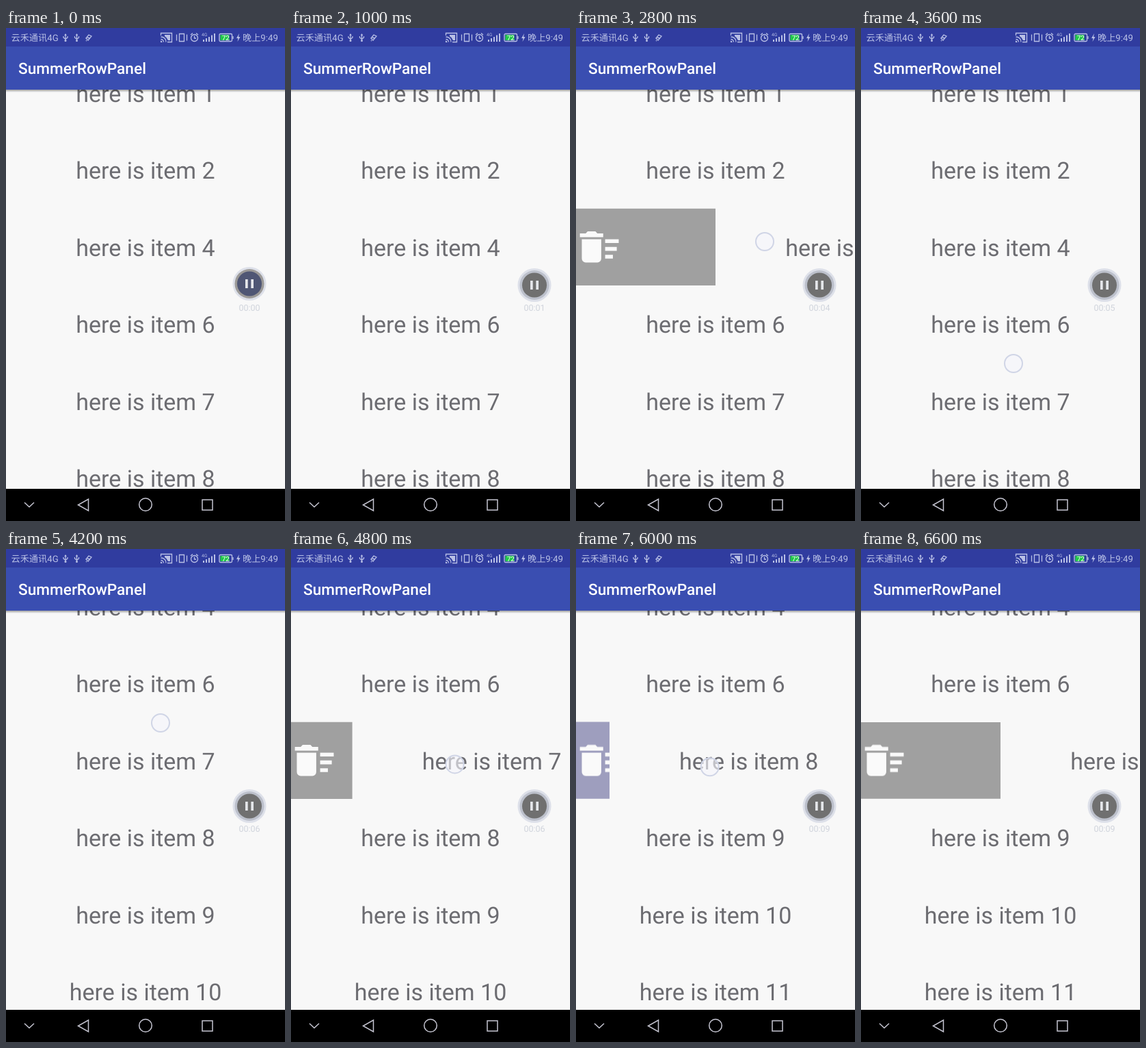
An HTML page that plays this animation: 408x720 px, repeating every 6.8 s.

```html
<!DOCTYPE html>
<html lang="zh">
<head>
<meta charset="utf-8">
<title>Swipe list</title>
<style>
  html, body { margin: 0; width: 100%; height: 100%; overflow: hidden; background: #f8f8f8; }
  svg { display: block; }
  #stage { width: 408px; height: 720px; font-family: Roboto, sans-serif; text-rendering: geometricPrecision; }
  .row { font-size: 34px; fill: #6c6c71; text-anchor: middle; }
  .status { font: 13.2px Roboto, "Noto Sans CJK SC", "Noto Sans CJK", sans-serif; fill: #b9c0e6; }
  .icon { fill: none; stroke: #b9c0e6; stroke-width: 1.3; }
  .solid { fill: #b9c0e6; stroke: none; }
  .nav { fill: none; stroke: #c6c6d2; stroke-width: 1.5; }
</style>
</head>
<body>
<svg id="stage" viewBox="0 0 408 720">
  <defs>
    <linearGradient id="shade" x2="0" y2="1">
      <stop offset="0" stop-color="#000" stop-opacity=".36"/>
      <stop offset="1" stop-color="#000" stop-opacity="0"/>
    </linearGradient>
    <g id="usb">
      <path d="M0-5V4M-3-2V0L0 2.500L3 0V-2"/>
      <path class="solid" d="M-1.800-3L0-6L1.800-3Z"/>
      <circle class="solid" cy="4.500" r="1.500"/>
    </g>
  </defs>
  <rect width="408" height="720" fill="#f8f8f8"/>
  <g id="rows"></g>

  <rect y="90" width="408" height="4" fill="url(#shade)"/>
  <rect width="408" height="90" fill="#3a4eb1"/>
  <rect width="408" height="27" fill="#303c9f"/>
  <text x="18" y="67" font-size="22.67" font-weight="500" fill="#fff">SummerRowPanel</text>

  <text class="status" x="7.5" y="19">云禾通讯4G</text>
  <g class="icon">
    <use href="#usb" x="87" y="14"/>
    <use href="#usb" x="103.5" y="14"/>
    <path d="M117 15L121 10L125 12L120 18ZM119 14L123 15M118 18L117 19"/>
    <path d="M226.500 11V7.500H242.500V20.500H236M226.500 13A7 7 0 0 1 234 20.500M226.500 16.500A4 4 0 0 1 230.500 20.500"/>
    <path class="solid" d="M226 18.500A2.500 2.500 0 0 1 228.500 21H226ZM232 10H240V18H237A10 10 0 0 0 232 12Z"/>
    <path d="M253.500 8.500H260.500V19.500H253.500ZM249.500 9.500V18.500M264.500 9.500V18.500"/>
    <circle cx="275.500" cy="14.500" r="5"/>
    <path d="M275.500 11.500V15H278M270 10L273 7.500M278 7.500L281 10"/>
    <path stroke-width="2" d="M289 20V17M293 20V15M297 20V13M301 20V10.500M305 20V8"/>
    <rect x="312" y="8.500" width="18.500" height="11" rx="1.500"/>
    <path d="M332 12V16"/>
    <rect class="solid" x="313.500" y="10" width="13" height="8" style="fill:#22c94a"/>
    <path class="solid" d="M341 8L337 15H339.500L338.500 20L342.500 13H340Z"/>
  </g>
  <text x="286" y="12" font-size="6.500" fill="#b9c0e6">4G</text>
  <text x="321.300" y="18" font-size="10" text-anchor="middle" fill="#fff">72</text>
  <text class="status" x="346" y="19">晚上9:49</text>

  <g id="button">
    <circle r="24.500" fill="#dde0e9"/>
    <circle id="rim" r="21.500"/>
    <circle id="core" r="18"/>
    <path d="M-6-6.500H-2.300V6.500H-6ZM2.300-6.500H6V6.500H2.300Z" fill="#e4e6ea"/>
  </g>
  <text id="clock" x="356" y="413" font-size="12.500" text-anchor="middle" fill="#d0d4dc"></text>
  <circle id="touch" r="13" fill="#f5f6fc" fill-opacity=".62" stroke="#d0d5e6" stroke-width="2"/>

  <rect y="673" width="408" height="47" fill="#000"/>
  <g class="nav">
    <path d="M27 693L34 699.500L41 693"/>
    <path d="M120.500 688V705L105.500 696.500Z"/>
    <circle cx="204" cy="696" r="9.300"/>
    <rect x="287" y="689" width="15" height="15"/>
  </g>
</svg>
<script>
const LOOP = 6800, STEP = 200, ROW = 112.5, TOP = 38.5, OPEN = 204, SNAP = 300;
const NS = "http://www.w3.org/2000/svg";
const $ = id => document.getElementById(id);

// The finger moves by dx, dy during dur; a drag without a row scrolls the list.
const drags = [
  { row: 4, start: 1200, dur: 1000, x: 160, y: 326, dx: 118, dy: -6 },
  { row: 4, start: 2800, dur: 400, x: 276, y: 312, dx: -126, dy: 6 },
  { start: 3600, dur: 600, x: 223, y: 490, dx: 3, dy: -236 },
  { row: 7, start: 4400, dur: 500, x: 150, y: 316, dx: 112, dy: -2 },
  { start: 5400, dur: 100, x: 34, y: 310, dx: 0, dy: 0 },
  { row: 8, start: 5800, dur: 460, x: 147, y: 320, dx: 112, dy: -4, tint: "#9e9ebe" }
];
const removed = { row: 7, start: 5400, dur: 300 };

const part = (t, start, dur) => Math.min(1, Math.max(0, (t - start) / dur));
const easeOut = p => 1 - (1 - p) ** 2;
const pressed = (d, t) => t >= d.start && t <= d.start + d.dur;

// A row follows the finger, then snaps open or shut on release.
function offset(row, t) {
  let x = 0;
  for (const d of drags) {
    if (d.row !== row || t < d.start) continue;
    x += d.dx * part(t, d.start, d.dur);
    const rest = d.dx > 0 ? OPEN : 0;
    x += (rest - x) * easeOut(part(t, d.start + d.dur, SNAP));
  }
  return x;
}

function scrolled(t) {
  return drags.filter(d => !d.row).reduce((y, d) => y - d.dy * part(t, d.start, d.dur), 0);
}

function set(el, attrs) {
  for (const k in attrs) el.setAttribute(k, attrs[k]);
}

function makeRow(n) {
  const g = document.createElementNS(NS, "g");
  g.innerHTML = `<svg width="0" height="${ROW}" overflow="hidden">
    <rect width="408" height="${ROW}"/>
    <g fill="#fafafa" transform="translate(0 22.2) scale(2.84)">
      <path d="M3 8H13V18a2 2 0 0 1-2 2H5a2 2 0 0 1-2-2ZM2 7V5H5L6 4H10L11 5H14V7Z"/>
      <path d="M15 8h7v2h-7zm0 4h6v2h-6zm0 4h4v2h-4z"/>
    </g></svg>
    <text class="row" y="69">here is item ${n}</text>`;
  $("rows").append(g);
  const [panel, label] = g.children;
  return { n, g, panel, label, fill: panel.firstElementChild };
}

const rows = [];
for (let n = 1; n <= 11; n++) if (n !== 3 && n !== 5) rows.push(makeRow(n));

function draw(t) {
  const drag = drags.find(d => pressed(d, t));
  const gone = part(t, removed.start, removed.dur);
  const shift = scrolled(t);

  rows.forEach((r, i) => {
    const x = offset(r.n, t);
    const y = TOP + ROW * (i - (r.n > removed.row ? gone : 0)) - shift;
    set(r.g, { transform: `translate(0 ${y})`, opacity: r.n === removed.row ? 1 - gone : 1 });
    set(r.panel, { width: x });
    set(r.fill, { fill: drag && drag.tint || "#a0a0a0" });
    set(r.label, { x: 204 + x });
  });

  set($("touch"), { visibility: drag ? "visible" : "hidden" });
  if (drag) {
    const p = part(t, drag.start, drag.dur);
    set($("touch"), { cx: drag.x + drag.dx * p, cy: drag.y + drag.dy * p });
  }

  const fresh = t < STEP;
  set($("button"), { transform: `translate(356 ${fresh ? 373.5 : 375.5})` });
  set($("rim"), { fill: fresh ? "#9c9a98" : "#bcc0cb" });
  set($("core"), { fill: fresh ? "#4f5674" : "#707070" });
  $("clock").textContent = "00:0" + Math.floor(t / 700 + gone / 2);
}

function tick(now) {
  draw(Math.floor(now % LOOP / STEP) * STEP);
  requestAnimationFrame(tick);
}
draw(0);
requestAnimationFrame(tick);
</script>
</body>
</html>
```
